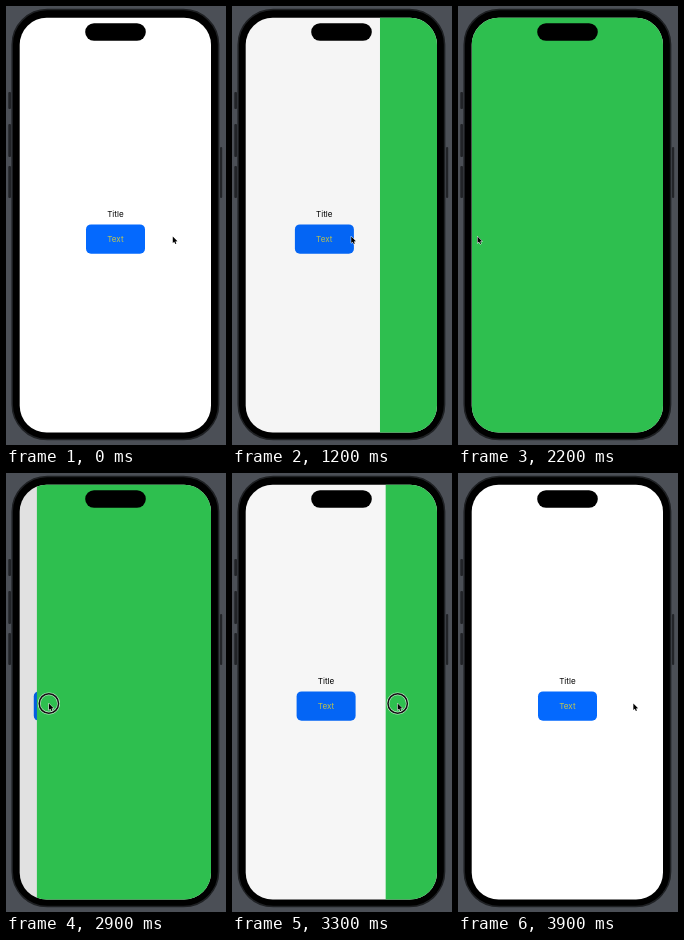
These frames come from a looping animation (220 by 439 pixels, 4000 ms). An HTML page:

```html
<!DOCTYPE html>
<html lang="en">
<head>
<meta charset="utf-8">
<title>Swipe back</title>
<style>
  html, body { margin: 0; width: 100%; height: 100%; overflow: hidden; background: #4b4f56; }
  svg { display: block; }
  text { font: 8.1px Inter, sans-serif; text-anchor: middle; }
</style>
</head>
<body>
<svg width="220" height="439" viewBox="0 0 220 439">
  <clipPath id="screen"><rect x="13.7" y="11.8" width="191.3" height="414.8" rx="27"/></clipPath>
  <g fill="#222428">
    <rect x="2.3" y="86" width="2.7" height="17" rx="1"/>
    <rect x="2.3" y="118" width="2.7" height="33" rx="1"/>
    <rect x="2.3" y="160" width="2.7" height="32" rx="1"/>
    <rect x="214" y="141" width="2.2" height="51" rx="1"/>
  </g>
  <rect x="6.2" y="3.6" width="206.4" height="430" rx="35" stroke="#1e2023" stroke-width="1.5"/>
  <g clip-path="url(#screen)">
    <rect width="220" height="439" fill="#fff"/>
    <g id="home">
      <text x="109.4" y="210.9">Title</text>
      <rect x="80" y="218.4" width="59" height="29.4" rx="5" fill="#0469fe"/>
      <text x="109.4" y="236.2" fill="#c3c650">Text</text>
    </g>
    <rect id="dim" width="220" height="439"/>
    <rect id="detail" x="13.7" width="200" height="439" fill="#2ebf4f"/>
  </g>
  <rect x="79.2" y="17.2" width="60.6" height="17.6" rx="8.8"/>
  <g id="cursor">
    <g id="ring" fill="none">
      <circle r="9.7" stroke="#fff" stroke-opacity=".7" stroke-width="2.8"/>
      <circle r="9.7" stroke="#111" stroke-width="1.5"/>
    </g>
    <path d="M0 0V6.6L1.5 5.3 2.5 7.6 3.6 7.1 2.6 4.9 4.7 4.8Z" stroke="#fff" stroke-width="1" paint-order="stroke"/>
  </g>
</svg>
<script>
  const LOOP = 4000, STEP = 100, LEFT = 13.7, WIDTH = 191.3;
  const PUSH = 1140, GRAB = 2700, RELEASE = 3300, LEAVE = 3700, SETTLED = 3830;
  const REST_X = 183.4;
  // Pointer moves: start, end, distance
  const moves = [
    [LEAVE - LOOP, 650, -70.4],
    [650, 800, 10],
    [1050, 2400, -110],
    [GRAB, 3450, 170.4]
  ];
  const [home, dim, detail, cursor, ring] =
    ['home', 'dim', 'detail', 'cursor', 'ring'].map(id => document.getElementById(id));

  function smooth(t, start, end) {
    const u = Math.min(1, Math.max(0, (t - start) / (end - start)));
    return u * u * (3 - 2 * u);
  }

  function pointerX(t) {
    const time = t < LEAVE ? t : t - LOOP;
    return moves.reduce((x, [start, end, distance]) => x + distance * smooth(time, start, end), REST_X);
  }

  // The dragged page edge trails the pointer by a fixed gap
  const dragged = t => 1 - Math.max(0, pointerX(t) - 12 - LEFT) / WIDTH;

  // Share of the screen covered by the detail page
  function coverage(t) {
    if (t < PUSH || t >= SETTLED) return 0;
    if (t < GRAB) {
      const s = (t - PUSH) * 0.0182;
      return 1 - (1 + s) * Math.exp(-s);
    }
    if (t < RELEASE) return dragged(t);
    return dragged(RELEASE) * (1 - (t - RELEASE) / (SETTLED - RELEASE)) ** 2;
  }

  const place = (node, x, y = 0) => node.setAttribute('transform', `translate(${x} ${y})`);

  function draw() {
    const t = Math.floor(performance.now() % LOOP / STEP) * STEP;
    const cover = coverage(t);
    const pressed = (t >= 1000 && t < 1200) || (t >= GRAB && t <= RELEASE);
    place(home, -0.3 * WIDTH * cover);
    place(detail, WIDTH * (1 - cover));
    place(cursor, pointerX(t), 230.5);
    dim.setAttribute('opacity', 0.13 * cover);
    ring.setAttribute('visibility', pressed ? 'visible' : 'hidden');
    requestAnimationFrame(draw);
  }
  draw();
</script>
</body>
</html>
```
